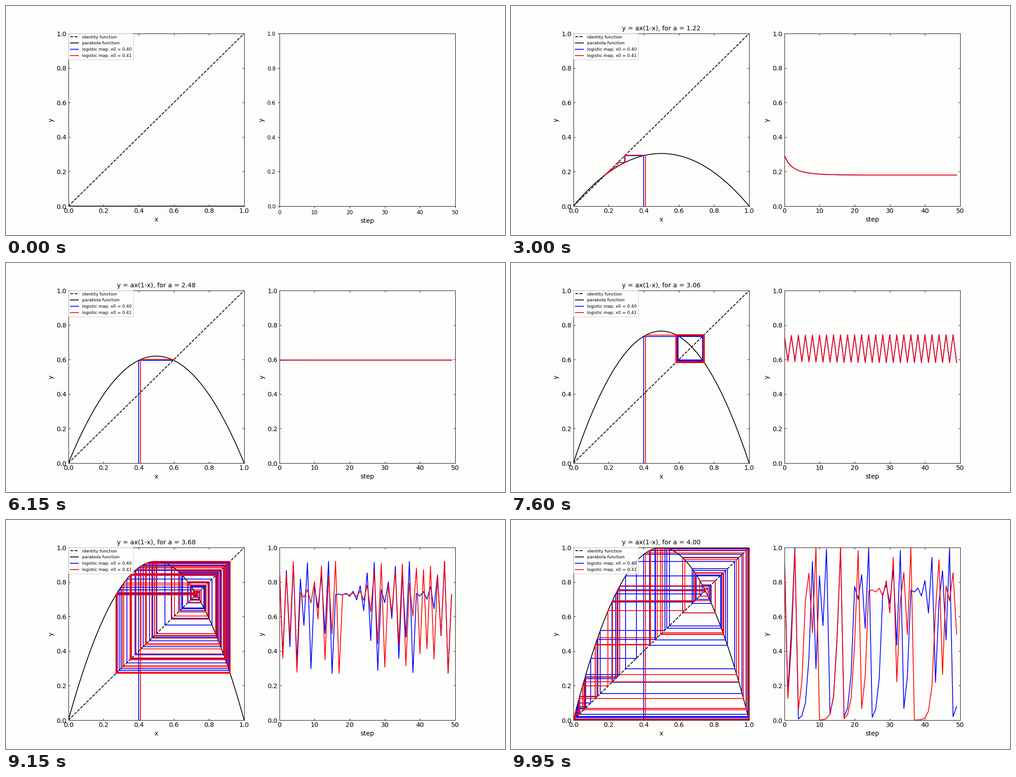
A matplotlib script for the animation above (10000 ms loop, 1102 px wide and 508 px high).

```python
import numpy as np
import matplotlib.pyplot as plt
from matplotlib.animation import FuncAnimation

W, H, DPI = 1102, 508, 84.75
FRAMES, STEPS, DA = 200, 50, 0.02
PAPER = "#fdfdfc"
STARTS = ((0.40, "b"), (0.41, "r"))

plt.rcParams.update({"font.family": "DejaVu Sans", "font.size": 10,
                     "figure.facecolor": PAPER, "axes.facecolor": PAPER})


def logistic(a, x):
    return a * x * (1 - x)


def orbit(a, x):
    values = []
    for _ in range(STEPS):
        x = logistic(a, x)
        values.append(x)
    return np.array(values)


def cobweb(x0, ys):
    """Staircase between the parabola and the diagonal."""
    xs = np.repeat(np.r_[x0, ys], 2)[:-1]
    heights = np.r_[0, np.repeat(ys, 2)]
    return xs, heights


def inner_ticks(ax):
    ax.tick_params(direction="in", top=True, right=True, labelsize=12)


def outer_ticks(ax):
    ax.tick_params(direction="out", top=False, right=False, labelsize=10)


fig, (left, right) = plt.subplots(
    1, 2, figsize=((W + 0.001) / DPI, (H + 0.001) / DPI), dpi=DPI)
fig.subplots_adjust(left=0.125, right=0.9, bottom=64 / H, top=447 / H, wspace=0.2)

left.set(xlim=(0, 1), ylim=(0, 1))
right.set(xlim=(0, STEPS), ylim=(0, 1))
for ax, label in ((left, "x"), (right, "step")):
    ax.set_xlabel(label, fontsize=12)
    ax.set_ylabel("y", fontsize=12)
inner_ticks(left)

grid = np.linspace(0, 1, 101)
left.plot(grid, grid, "k--", label="identity function")
parabola, = left.plot(grid, 0 * grid, "k", label="parabola function")
webs = [left.plot([], [], c, label=f"logistic map; x0 = {x0:.2f}")[0]
        for x0, c in STARTS]
series = [right.plot([], [], c)[0] for _, c in STARTS]
left.legend(loc="upper left", fontsize=8, borderaxespad=0, facecolor=PAPER)
title = left.set_title("", fontsize=12)


def update(n):
    blank = n == 0
    a = 0 if blank else (n + 1) * DA
    (outer_ticks if blank else inner_ticks)(right)
    title.set_text("" if blank else f"y = ax(1-x), for a = {a:.2f}")
    parabola.set_ydata(logistic(a, grid))
    for (x0, _), web, line in zip(STARTS, webs, series):
        if blank:
            web.set_data([], [])
            line.set_data([], [])
        else:
            ys = orbit(a, x0)
            web.set_data(*cobweb(x0, ys))
            line.set_data(np.arange(STEPS), ys)
    return [parabola, title, *webs, *series]


anim = FuncAnimation(fig, update, frames=FRAMES, interval=50, repeat=True,
                     repeat_delay=0, blit=False)
plt.show()
```
